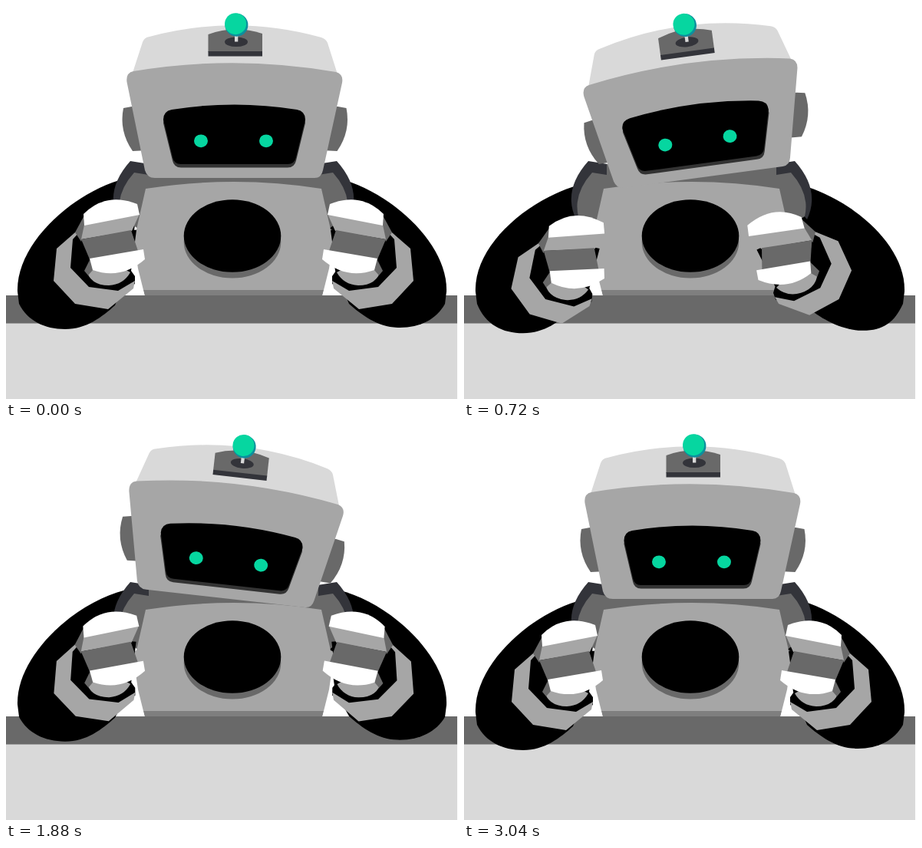
Animation, 589 px wide and 512 px high, one loop 3080 ms. Source, as an HTML page:

```html
<!DOCTYPE html>
<html lang="en">
<head>
<meta charset="utf-8">
<title>Robot</title>
<style>
  html, body { margin: 0; width: 100%; height: 100%; overflow: hidden; background: #fff; }
  svg { display: block; width: 589px; height: 512px; }
  .light { fill: #d9d9d9; }
  .grey { fill: #a6a6a6; }
  .mid { fill: #696969; }
  .dark { fill: #33343a; }
  .white { fill: #fff; }
  .green { fill: #06d6a0; }
</style>
</head>
<body>
<svg viewBox="0 0 589 512">
  <defs>
    <g id="shoulder">
      <path class="dark" d="M162 202 L187 206 V222 L170 250 L146 278 Q128 240 162 202Z"/>
      <path class="mid" d="M167 217 L186 220 V206 H300 V290 H172 L149 274 Q142 245 167 217Z"/>
    </g>
    <path id="ear" class="mid" d="M164 131 L153 133 Q147 163 165 189 L185 188 V131Z"/>
    <path id="visor" d="M205 148 Q205 137 216 135 Q298 122 379 135 Q390 137 390 148 L378 197 Q376 206 367 206 H228 Q219 206 217 197Z"/>
    <g id="hand">
      <path d="M97 285 L86 305 L83 342 L107 368 L146 373 L168 362 L168 352 L163 345 L170 292Z"/>
      <path class="grey" d="M98 288 L66 316 L62 358 L90 388 L133 395 L166 368 L168 358 L146 371 L108 366 L84 341 L87 304 L96 294Z"/>
      <path class="grey" d="M104 342 Q109 364 134 364 Q153 363 162 347 L140 335Z"/>
      <path class="mid" d="M110 329 L102 345 L107 351 L114 343Z"/>
      <path class="mid" d="M103 271 L90 295 L98 307 L106 286Z"/>
      <path class="grey" d="M102 285 L174 271 L164 293 L98 304Z"/>
      <path class="mid" d="M98 304 L163 292 L172 319 L109 330Z"/>
      <path class="white" d="M101 271 Q130 242 171 258 L174 272 L102 286Z"/>
      <path class="white" d="M109 329 L179 317 L181 330 Q150 357 113 344Z"/>
    </g>
  </defs>

  <path class="mid" d="M0 377H588V414H0Z"/>
  <path class="light" d="M0 413.5H588V512H0Z"/>

  <path id="armL"/>
  <path id="armR" transform="matrix(-1 0 0 1 589 0)"/>
  <use href="#shoulder"/>
  <use href="#shoulder" transform="matrix(-1 0 0 1 593 0)"/>

  <path class="mid" d="M165 293 L181 377 H412 L428 293Z"/>
  <path class="grey" d="M182 238 Q297 220 411 238 L423 291 L428 293 L421 342 L414 370 H179 L172 342 L165 293 L170 291Z"/>
  <path fill="#7f7f7f" d="M179 370H414L412 377H181Z"/>
  <ellipse class="mid" cx="295" cy="307.5" rx="63.3" ry="47"/>
  <ellipse cx="295" cy="299.5" rx="63.3" ry="47.3"/>

  <g id="head">
    <use href="#ear"/>
    <use href="#ear" transform="matrix(-1 0 0 1 596.5 0)"/>
    <path class="light" d="M164 90 L178 47 Q180 41 187 40 Q300 10 411 41 Q417 43 419 48 L433 92Z"/>
    <path class="grey" d="M157.5 99 Q156 87 166 85 Q297 63 430 86 Q440 89 438 100 L413 214 Q411 224 402 224 H194 Q184 224 181 214Z"/>
    <path class="mid" d="M263.5 37 Q298 24 334 36 V60 H263.5Z"/>
    <path class="dark" d="M263.5 59H334V65.5H263.5Z"/>
    <ellipse class="dark" cx="300" cy="46.7" rx="15" ry="6.3"/>
    <path class="light" d="M298 36H302.3V46.5H298Z"/>
    <circle cx="300.4" cy="24.7" r="15" fill="#0d8f9e"/>
    <circle class="green" cx="299.1" cy="23.2" r="14"/>
    <g id="screen">
      <use href="#visor" y="4.5" fill="#333"/>
      <use href="#visor"/>
    </g>
    <ellipse class="green" cx="254" cy="175.8" rx="9" ry="8.4"/>
    <ellipse class="green" cx="339" cy="175.8" rx="9" ry="8.4"/>
  </g>

  <use id="handL" href="#hand"/>
  <g id="handR"><use href="#hand" transform="matrix(-1 0 0 1 593 0)"/></g>
</svg>
<script>
const LOOP = 3080, FRAME = 40, HITS = [200, 1200, 2200], ARM_LAG = 30;
const el = id => document.getElementById(id);

// Quick straight move that reaches its goal at u = 0, then rings out.
function spring(u) {
  if (u < 0) return Math.max(0, 1 + u / 150);
  const s = u / 1000;
  return 1 + 0.3 * Math.sin(22 * s) * Math.exp(-4 * s);
}

// Values for: start, lean left, lean right, end.
function blend(values, t) {
  return HITS.reduce((v, hit, i) => v + (values[i + 1] - values[i]) * spring(t - hit), values[0]);
}

function armPath(top, side, low, lowX) {
  return `M155 ${top} C90 ${top + 16} 13 ${side - 64} 15 ${side} L17 ${side + 16}` +
    ` C28 ${low - 11} ${lowX - 27} ${low} ${lowX} ${low}` +
    ` C${lowX + 28} ${low} 125 ${low - 16} 142 ${low - 31} L160 345 L168 285Z`;
}

function place(id, x, y, dx, dy, turn) {
  el(id).setAttribute('transform', `translate(${dx} ${dy}) rotate(${turn} ${x} ${y})`);
}

function draw(t) {
  const at = (...v) => blend(v, t);
  const arm = (...v) => blend(v, t - ARM_LAG);

  place('head', 297, 117, 0, 0, at(0, -8, 6.2, 0));
  const wide = at(1, 1.04, 1.005, 0.962);
  el('screen').setAttribute('transform', `matrix(${wide} 0 0 1 ${297.5 * (1 - wide)} 0)`);

  const top = arm(225, 232, 213, 225), side = arm(372, 372, 362, 372);
  el('armL').setAttribute('d', armPath(top, side, arm(421, 426.5, 410, 421), 77));
  el('armR').setAttribute('d', armPath(top, side, arm(419, 423, 408, 419), arm(76, 69, 76, 76)));

  place('handL', 122, 320, arm(0, 3.8, 0, 0), arm(0, 18.7, -11, 0), arm(0, 7.3, -0.5, 0));
  place('handR', 470, 320, arm(0, -36.5, 0, 0), arm(0, 9, -11, 0), arm(0, -20, 0.5, 0));
}

const begin = performance.now();
function tick() {
  const t = (performance.now() - begin) % LOOP;
  draw(Math.floor(t / FRAME) * FRAME);
  requestAnimationFrame(tick);
}
tick();
</script>
</body>
</html>
```
